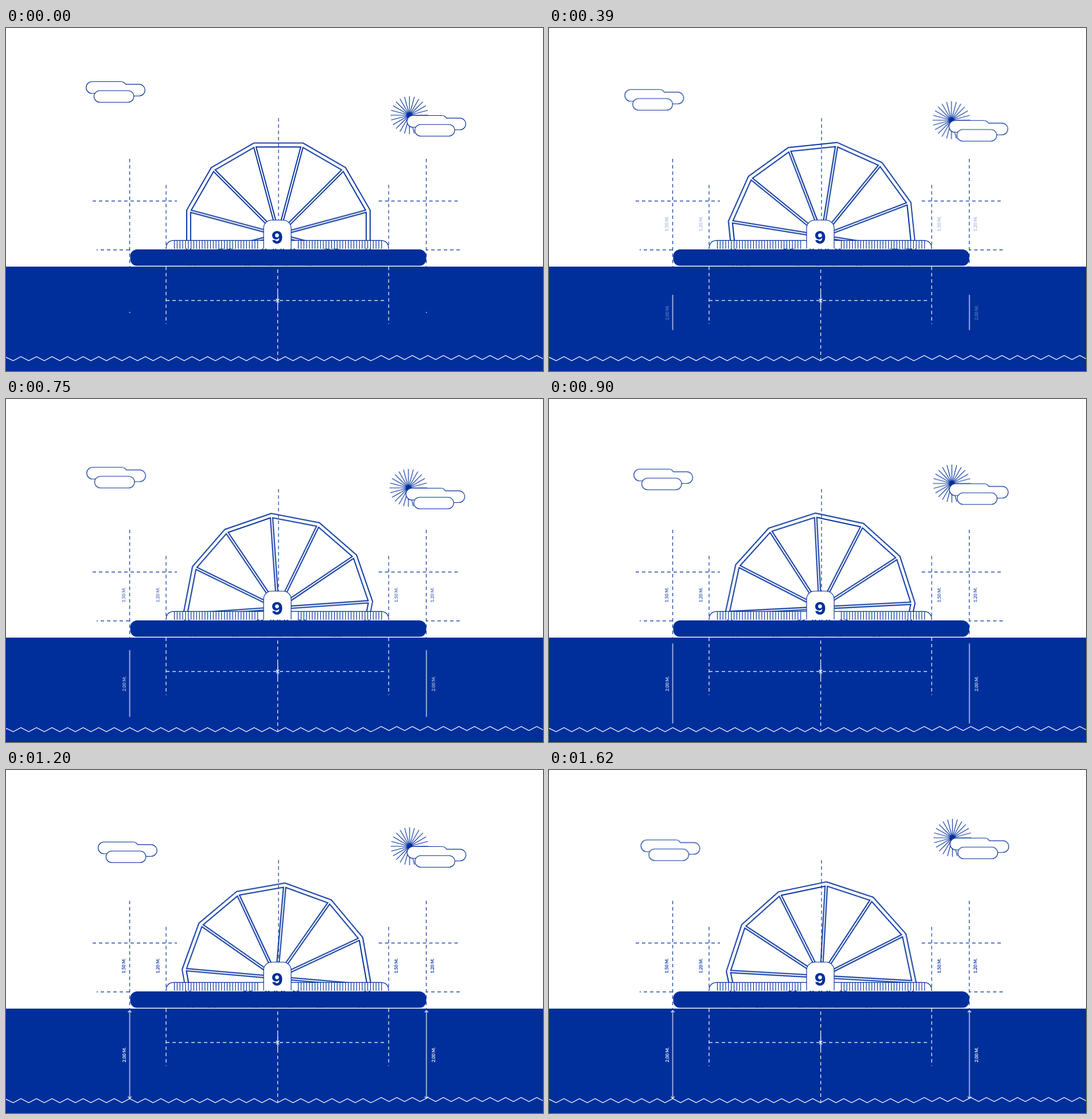
Animation, 936 px wide and 598 px high, one loop 1650 ms. Source, as an HTML page:

```html
<!DOCTYPE html>
<html lang="en">
<head>
<meta charset="utf-8">
<title>Paddle wheel blueprint</title>
<style>
  html, body { margin: 0; width: 100%; height: 100%; overflow: hidden; background: #fff; }
  svg { display: block; width: 936px; height: 598px; --ink: #002f9c; }
  .ink { fill: none; stroke: var(--ink); stroke-width: 1.15; }
  .white { fill: none; stroke: #fff; stroke-width: 1.2; }
  .dash { stroke-dasharray: 6 5; }
  .fill { fill: #fff; }
  .solid { fill: var(--ink); }
  .label { font: 700 7.7px Lato, sans-serif; text-anchor: middle; }
  .number { font: 800 30px Inter, sans-serif; text-anchor: middle; fill: var(--ink); }
  .wheel, .cloud, .sun, .grow, .tip, .label { animation: 1650ms infinite both; }
  .wheel { animation-name: spin; stroke-width: 1.9; }
  .cloud { animation-name: drift; }
  .sun { animation-name: bob; }
  .grow { animation-name: grow; }
  .tip { animation-name: tip; }
  .label { animation-name: fade; }
</style>
</head>
<body>
<svg viewBox="0 0 936 598">
  <defs>
    <g id="cloudShape" class="ink fill">
      <path d="M10.2 20.5A10.2 10.2 0 0 1 10.2 0H61Q66.500 .2 68.500 4.600H92.300A10.200 10.200 0 0 1 92.300 25H76V20.500Z"/>
      <rect x="13.700" y="15.700" width="69.500" height="20.300" rx="10.150"/>
    </g>
  </defs>

  <g class="cloud"><use href="#cloudShape" x="139.7" y="93.5"/></g>
  <g class="sun">
    <path id="rays" class="ink" transform="translate(703.2 152)"/>
    <circle class="solid" cx="703.2" cy="152" r="4.5"/>
    <use href="#cloudShape" x="698.9" y="152.5"/>
  </g>

  <g transform="translate(474 362.4)"><path id="wheel" class="ink wheel"/></g>

  <path class="ink fill" d="M279 384.500Q279.500 370.300 293 370.300H653Q666.500 370.300 667 384.500" />
  <path id="slats" class="ink"/>
  <path class="ink dash" d="M475 157V335M215.600 228V416M732.500 228V416M279 273.500V385M667 273.500V385M151 301.600H298M649.500 301.600H791.500M791 386.800H733M215 386.800H158"/>
  <path class="ink fill" stroke="none" d="M449 384.500V349A14 14 0 0 1 463 335H483A14 14 0 0 1 497 349V384.500"/>
  <text class="number" x="472.800" y="376">9</text>

  <rect class="solid" y="416" width="936" height="182"/>
  <rect class="solid" x="216.500" y="386" width="516" height="28.700" rx="12"/>
  <path class="white" d="M217 415.400H732"/>
  <path class="white dash" d="M279 416V516M667 416V516M279 475.200H661M473.600 421V580"/>
  <path class="white" d="M473.600 460V488M471 472L473.600 475.200L476.200 472M471 478.500L473.600 475.200L476.200 478.500"/>
  <path id="waves" class="white"/>
  <g id="measures"></g>
</svg>

<script>
const FRAMES = 55;
const $ = id => document.getElementById(id);
const polar = (r, deg) => {
  const a = deg * Math.PI / 180;
  return [r * Math.sin(a), -r * Math.cos(a)];
};
const pt = p => p.map(v => v.toFixed(2)).join(' ');
const range = (n, fn) => Array.from({ length: n }, (_, i) => fn(i));

// Rays of the sun
$('rays').setAttribute('d', range(24, i => `M0 0L${pt(polar(33, i * 15))}`).join(''));

// Twelve-sided rim with one triangle per bay, mounted slightly off axis
const R = 165.5, inner = 153, gap = 2;
const [ox, oy] = polar(2.2, 22);
const shift = ([x, y]) => pt([x + ox, y + oy]);
const tan15 = Math.tan(Math.PI / 12);
const half = inner * tan15 - gap / Math.cos(Math.PI / 12);
const reach = Math.hypot(half, inner), spread = Math.atan2(half, inner) * 180 / Math.PI;
const apex = inner - half / tan15;
const rim = 'M' + range(12, i => shift(polar(R, 15 + i * 30))).join('L') + 'Z';
const bays = range(12, i => {
  const mid = i * 30;
  const corners = [polar(apex, mid), polar(reach, mid - spread), polar(reach, mid + spread)];
  return 'M' + corners.map(shift).join('L') + 'Z';
});
$('wheel').setAttribute('d', rim + bays.join(''));

// Railing slats
const slats = x0 => range(31, i => `M${(x0 + i * 4.84).toFixed(2)} 370.3V385`).join('');
$('slats').setAttribute('d', slats(293.5) + slats(509.5));

// Sea bed zigzag, in two runs
const zigzag = (x0, n, low, high) =>
  range(n, i => `L${(x0 + i * 13.55).toFixed(2)} ${i % 2 ? high : low}`).join('');
$('waves').setAttribute('d', 'M-1 573.5' + zigzag(12.5, 47, 580, 573) + zigzag(640.5, 23, 578, 571));

// Measuring lines and labels
const label = (x, y, text, fill) =>
  `<text class="label" fill="${fill}" transform="translate(${x} ${y}) rotate(-90)" y="2.8">${text}</text>`;
const measure = x => `<g class="white" transform="translate(${x} 495.900)">
  <path class="grow" d="M0 -76.5V76.5"/>
  <path class="tip" d="M-3 -73.500L0 -76.500L3 -73.500M-3 73.500L0 76.500L3 73.500"/></g>`;
$('measures').innerHTML = measure(215.6) + measure(732.8) +
  [[205, '1.50 M.'], [264.5, '1.20 M.'], [680, '1.50 M.'], [743, '1.20 M.']]
    .map(([x, s]) => label(x, 341.5, s, 'var(--ink)')).join('') +
  [206, 745].map(x => label(x, 496.5, '2.00 M.', '#fff')).join('');

// Keyframes stepping at the 30 ms frame rate: keys are [frame, ...values]
function keyframes(name, keys, css) {
  const rules = keys.map(([f, ...v], i) => {
    const next = keys[i + 1] ? keys[i + 1][0] : FRAMES;
    return `${f / FRAMES * 100}% { ${css(...v)}; animation-timing-function: steps(${next - f}, end) }`;
  });
  const last = keys[keys.length - 1].slice(1);
  return `@keyframes ${name} { ${rules.join('\n')} 100% { ${css(...last)} } }`;
}
const move = (x, y) => `transform: translate(${x}px, ${y}px)`;
const opacity = v => `opacity: ${v}`;

const style = document.createElement('style');
style.textContent = [
  keyframes('spin', [[0, 0], [13, 84.1], [21, 136.1], [30, 192.1], [40, 260], [49, 316.1], [54, 348.2]],
    a => `transform: rotate(${a}deg)`),
  keyframes('drift', [[0, 0, 0], [7, -4.6, 7.7], [13, -7.5, 13.7], [16, -8.5, 17.4], [18, -7.7, 19.8],
    [21, -4.6, 23], [30, 8.2, 28.7], [36, 17, 31.2], [40, 20.9, 32], [44, 22, 31.8],
    [49, 21.4, 30.2], [54, 20.6, 28.4]], move),
  keyframes('bob', [[0, 0, 0], [7, -1, 5.2], [13, -1.7, 8.7], [17, -2.2, 10], [21, -2.3, 8],
    [25, -1.8, 3], [30, -1, -4.7], [36, 0, -13.8], [40, 0.2, -19], [49, 0.2, -28.2], [54, 0, -33.8]], move),
  keyframes('grow', [[0, 0.013], [33, 1]], s => `transform: scaleY(${s})`),
  keyframes('tip', [[0, 0], [33, 1]].flatMap(k => k[0] ? [[32, 0], k] : [k]), opacity),
  keyframes('fade', [[0, 0], [36, 1]], opacity)
].join('\n');
document.head.append(style);
</script>
</body>
</html>
```
